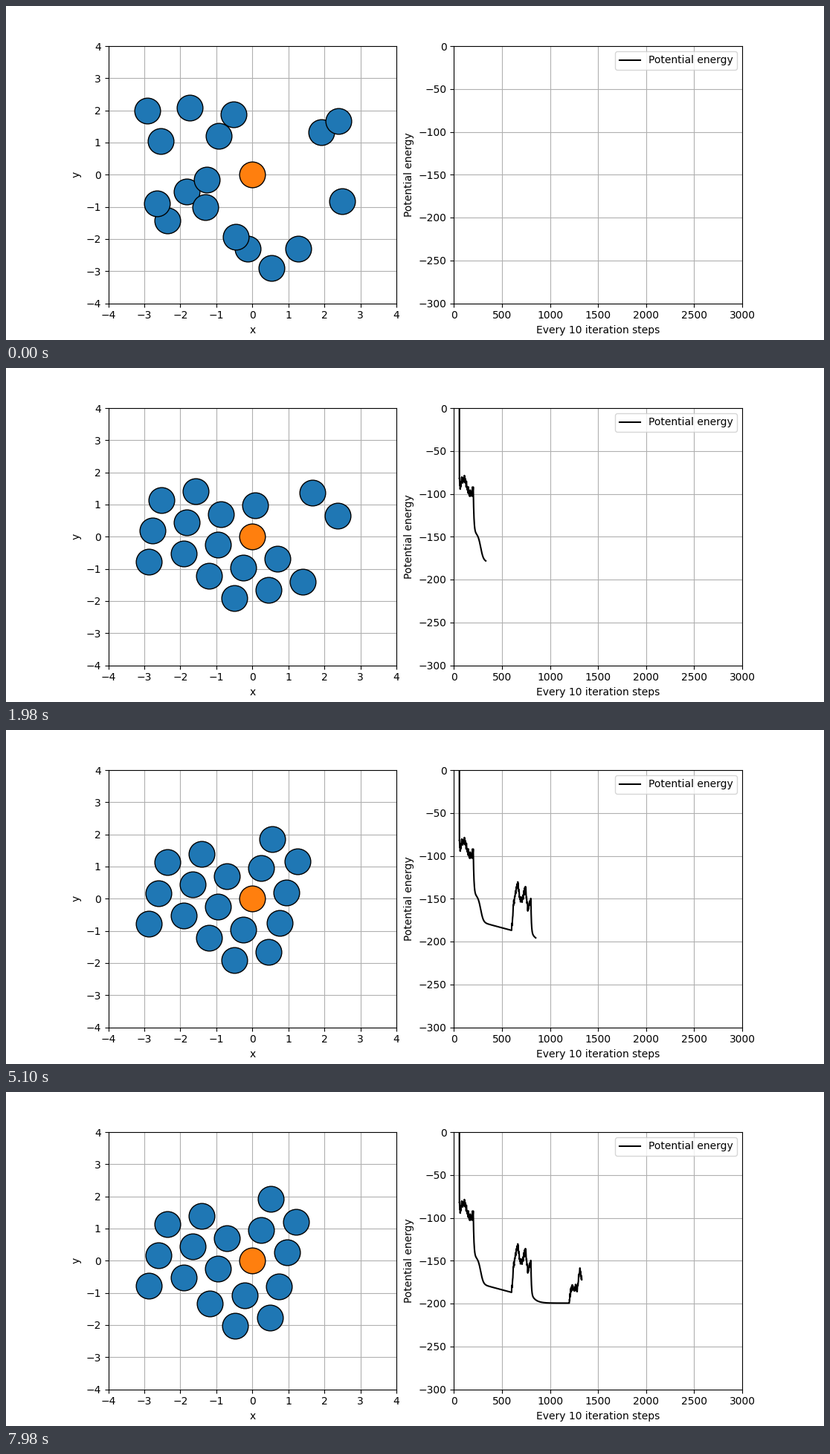
Write a matplotlib script that moves like this. It is 1100 px wide and 450 px high and loops after 8 s.

```python
import numpy as np
import matplotlib.pyplot as plt
from matplotlib.animation import FuncAnimation

STEPS, STEP_MS, TICK_MS, LOOP_MS = 134, 60, 40, 8000
SPACING, TILT = 0.99, 15.2
rng = np.random.default_rng(7)

# occupied sites (u, v) of the final hexagonal crystal, row by row, back to front
rows = {2: (-3, -2, 0), 0: (-3, -2, -1, 1), 1: (-3, -2, -1, 0, 1),
        -1: (-1, 0, 1), -2: (0, 1)}
sites = [(u, v) for v, us in rows.items() for u in us]
# four particles first settle on a neighbouring site
early = {(0, 2): (1, 1), (1, 1): (2, 0), (1, 0): (1, -1), (1, -1): (2, -2)}
last = np.array(sites, float)
first = np.array([early.get(s, s) for s in sites], float)

# scattered start, in the order of the sites
start = np.array([
    (-2.91, 1.99), (-1.73, 2.08), (1.92, 1.32),
    (-2.35, -1.43), (-1.82, -0.53), (-1.26, -0.16), (2.50, -0.83),
    (-2.64, -0.90), (-2.54, 1.04), (-0.93, 1.20), (-0.52, 1.87), (2.39, 1.66),
    (-1.30, -1.02), (-0.12, -2.31), (1.28, -2.31),
    (-0.45, -1.94), (0.54, -2.91)])

# three fragments of the crystal come loose while it is hot
u, v = last.T
right = u + v == 2
left = (v > 0) & ~right
low = v < 0


def fragment_drift(k):
    times = [22, 33, 58, 60, 73, 82, 120, 133]
    parts = [(left, (-0.42, 0.02), [1, 0.4, 0, 0, 0, 0, 0, 0]),
             (right, (0.65, 0.20), [1, 0.7, 0, 0, 0.4, 0, 0, 0]),
             (low, (0.10, -0.32), [1, 0, 0, 0, 0.9, 0, 0, 0.35])]
    return sum(np.outer(mask, offset) * np.interp(k, times, amount)
               for mask, offset, amount in parts)


def crystal(uv, tilt):
    t = np.radians([tilt, tilt + 60])
    return SPACING * uv @ np.column_stack([np.cos(t), np.sin(t)])


def bridge(n, shape, sigma):
    """Random walk of n steps that starts and ends at zero."""
    walk = np.cumsum(rng.normal(0, sigma, (n + 1, *shape)), axis=0)
    walk -= walk[0]
    return walk - np.linspace(0, 1, n + 1)[:, None, None] * walk[-1]


def separate(points, gap):
    """Push overlapping particles apart; the centre one stays fixed."""
    p = np.vstack([points, [0, 0]])
    for _ in range(15):
        d = p[:, None] - p[None]
        dist = np.hypot(d[..., 0], d[..., 1])
        np.fill_diagonal(dist, 9)
        push = np.clip(gap - dist, 0, None) / 2
        p += (d / np.maximum(dist, 0.05)[..., None] * push[..., None]).sum(axis=1)
        p[-1] = 0
    return p[:-1]


def particle_positions(k):
    gathered = np.interp(k, [0, 22], [0, 1])
    moved = np.interp(k, [60, 73, 80, 84, 101], [0, 0.5, 0.65, 0.92, 1])
    tilt = TILT + np.interp(k, [33, 58, 73], [0, 2, 0])
    home = crystal(first + (last - first) * moved, tilt) + fragment_drift(k)
    return start + (home - start) * gathered


def particle_paths():
    path = np.array([particle_positions(k) for k in range(STEPS)])
    for a, b in [(0, 22), (60, 73), (73, 82), (120, 133)]:
        path[a:b + 1] += bridge(b - a, path.shape[1:], 0.075)
    return [separate(p, min(0.9, 0.45 + 0.08 * k)) for k, p in enumerate(path)]


def decay(d, tau):
    return 1 - np.exp(-np.maximum(d, 0) / tau)


def energy_curve(x):
    """Noisy plateaus while hot, smooth relaxation while cold."""
    hot = np.interp(x, *zip(
        (54, 400), (56, -85), (64, -95), (78, -84), (114, -82), (145, -97),
        (182, -102), (200, -92), (600, -187), (615, -161), (631, -148),
        (662, -131), (692, -152), (708, -153), (742, -136), (770, -163),
        (800, -150), (1200, -199.5), (1207, -190), (1228, -179), (1250, -185),
        (1265, -179), (1280, -186), (1310, -160), (1330, -170)))
    hot += np.convolve(rng.normal(0, 2.4, x.size), [0.3, 0.7, 0.3], "same")
    d = x - 200
    cold1 = -92 - 53 * decay(d, 7) - 30 / (1 + np.exp((77 - d) / 14)) - 0.03 * d
    d = x - 800
    cold2 = -150 - 38 * decay(d, 5) - 11.5 * decay(d, 45)
    return np.where(x % 600 < 200, hot, np.where(x < 600, cold1, cold2))


paths = particle_paths()
steps = np.arange(10 * STEPS)
energy = energy_curve(steps)

fig, (box, chart) = plt.subplots(1, 2, figsize=(11, 4.5), dpi=100)

box.set(xlim=(-4, 4), ylim=(-4, 4), xlabel="x", ylabel="y",
        xticks=range(-4, 5), yticks=range(-4, 5))
box.grid()
ball = dict(ls="", marker="o", markersize=25, mec="black", mew=1)
particles, = box.plot([], [], color="tab:blue", **ball)
box.plot([0], [0], color="tab:orange", **ball)

chart.set(xlim=(0, 3000), ylim=(-300, 0), xlabel="Every 10 iteration steps",
          ylabel="Potential energy", xticks=range(0, 3001, 500),
          yticks=range(-300, 1, 50))
chart.grid()
curve, = chart.plot([], [], color="black", label="Potential energy")
chart.legend(loc="upper right")


def update(i):
    k = min((i * TICK_MS + TICK_MS // 2) // STEP_MS, STEPS - 1)
    particles.set_data(*paths[k].T)
    n = 10 * k + 1
    curve.set_data(steps[:n], energy[:n])
    return particles, curve


anim = FuncAnimation(fig, update, frames=LOOP_MS // TICK_MS,
                     interval=TICK_MS, repeat=True, repeat_delay=0)
plt.show()
```
